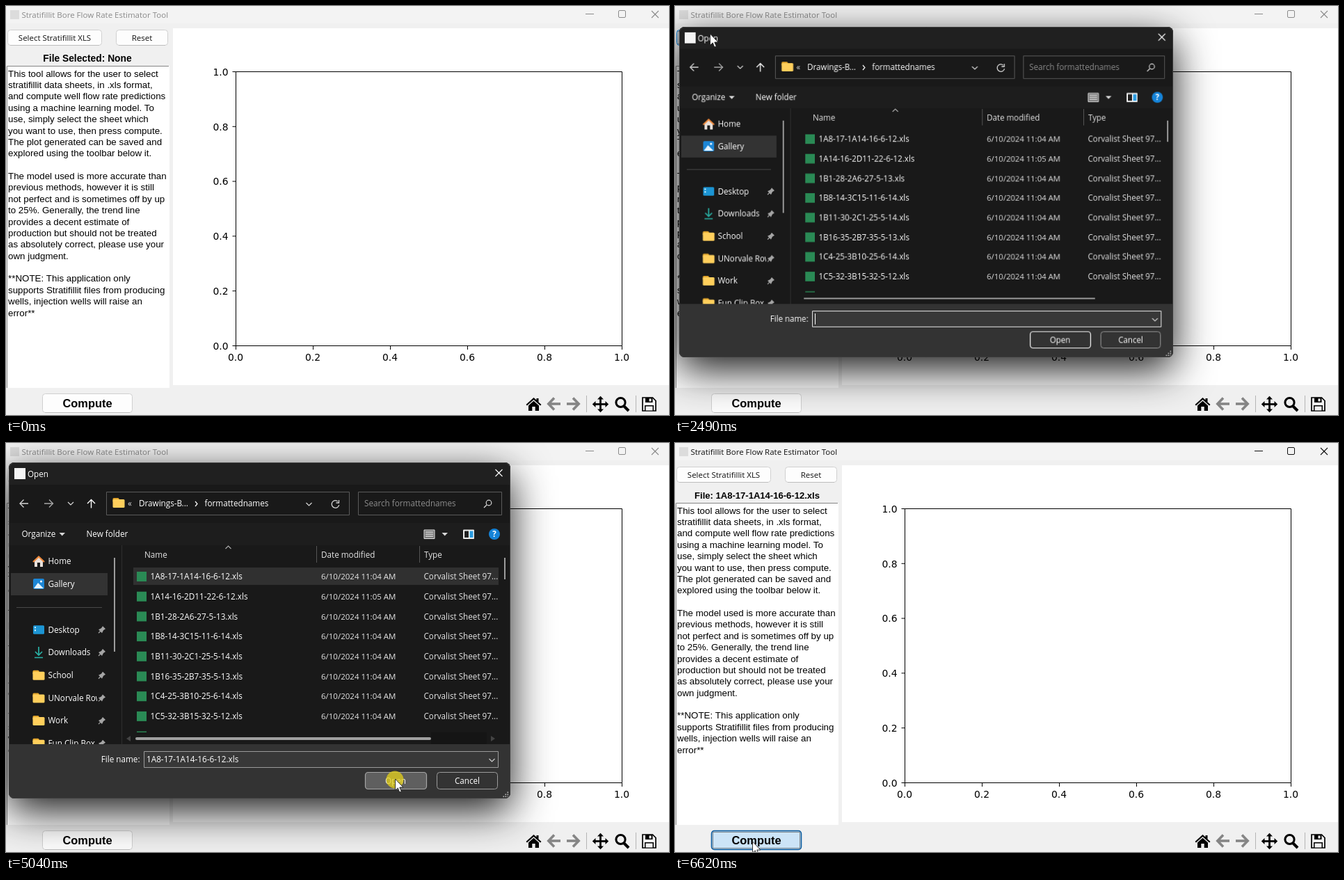
An HTML page with a canvas for the animation above (8 s loop, 953 by 588 pixels).

```html
<!DOCTYPE html>
<html lang="en">
<head>
<meta charset="utf-8">
<title>Flow rate tool</title>
<style>
html, body { margin: 0; width: 100%; height: 100%; overflow: hidden; background: #f0f0f0; }
canvas { display: block; }
</style>
</head>
<body>
<canvas id="stage" width="953" height="588"></canvas>
<script>
const UI = '"Open Sans", "Noto Sans", sans-serif';
const ARIAL = '"Liberation Sans", Arial, sans-serif';
const PLOT = '"DejaVu Sans", sans-serif';
const LOOP = 8000, STEP = 68.9, FIRST = 890;
const WIN = { x: 4, y: 28, w: 721, h: 483 };
const PICK = '1A8-17-1A14-16-6-12.xls';

const stage = document.getElementById('stage').getContext('2d');
const layer = document.createElement('canvas');
layer.width = WIN.w;
layer.height = WIN.h;
const dialog = layer.getContext('2d');
let g = stage;

// ---------- helpers ----------
function text(s, x, y, color = '#fff', size = 11.7, family = UI, align = 'left', weight = '') {
  g.font = `${weight} ${size}px ${family}`;
  g.textAlign = align;
  g.fillStyle = color;
  g.fillText(s, x, y);
}
function rect(x, y, w, h, color) {
  g.fillStyle = color;
  g.fillRect(x, y, w, h);
}
function box(x, y, w, h, r, fill, stroke, lw = 1) {
  g.beginPath();
  g.roundRect(x, y, w, h, r);
  if (fill) { g.fillStyle = fill; g.fill(); }
  if (stroke) { g.strokeStyle = stroke; g.lineWidth = lw; g.stroke(); }
}
function trace(p) {
  g.beginPath();
  for (let i = 0; i < p.length; i += 2) g.lineTo(p[i], p[i + 1]);
}
function line(color, lw, ...p) {
  trace(p);
  g.strokeStyle = color;
  g.lineWidth = lw;
  g.stroke();
}
function poly(color, ...p) {
  trace(p);
  g.fillStyle = color;
  g.fill();
}
function disc(x, y, r, color) {
  g.beginPath();
  g.arc(x, y, r, 0, 7);
  g.fillStyle = color;
  g.fill();
}
function ring(x, y, r, color, lw, a = 0, b = 7) {
  g.beginPath();
  g.arc(x, y, r, a, b);
  g.strokeStyle = color;
  g.lineWidth = lw;
  g.stroke();
}
function clipped(x, y, w, h, draw) {
  g.save();
  g.beginPath();
  g.rect(x, y, w, h);
  g.clip();
  draw();
  g.restore();
}
function cross(x, y, r, color) {
  line(color, 1.1, x - r, y - r, x + r, y + r);
  line(color, 1.1, x + r, y - r, x - r, y + r);
}
function chevron(x, y, r, color, dir = 1) {
  line(color, 1.2, x - r, y - dir * r / 2, x, y + dir * r / 2, x + r, y - dir * r / 2);
}
function dotted(x, y, w, h) {
  g.setLineDash([1, 1]);
  box(x, y, w, h, 0, null, '#222');
  g.setLineDash([]);
}

// ---------- main window ----------
const STYLE = {
  idle: ['#fdfdfd', '#d0d0d0'],
  hover: ['#e0eef9', '#0078d4'],
  down: ['#cce4f7', '#005499']
};
const NOTES = [
  'This tool allows for the user to select',
  'stratifillit data sheets, in .xls format,',
  'and compute well flow rate predictions',
  'using a machine learning model. To',
  'use, simply select the sheet which',
  'you want to use, then press compute.',
  'The plot generated can be saved and',
  'explored using the toolbar below it.',
  '',
  'The model used is more accurate than',
  'previous methods, however it is still',
  'not perfect and is sometimes off by up',
  'to 25%. Generally, the trend line',
  'provides a decent estimate of',
  'production but should not be treated',
  'as absolutely correct, please use your',
  'own judgment.',
  '',
  '**NOTE: This application only',
  'supports Stratifillit files from producing',
  'wells, injection wells will raise an',
  'error**'
];

function button(x, y, w, h, state) {
  const [fill, edge] = STYLE[state];
  box(x + .5, y + .5, w - 1, h - 1, 4, fill, edge, state === 'down' ? 1.5 : 1);
  if (state === 'idle') line('#bdbdbd', 1, x + 4, y + h - .5, x + w - 4, y + h - .5);
}

function titleBar(active) {
  rect(0, 0, 953, 25, '#f3f3f3');
  rect(6, 6, 13, 13, '#dcdcdc');
  const c = active ? '#111' : '#8a8a8a';
  text('Stratifillit Bore Flow Rate Estimator Tool', 22.5, 17, c, 11.5);
  line(c, 1, 833, 11.5, 845, 11.5);
  box(880.5, 6.5, 10, 10, 1.5, null, c);
  cross(933, 12, 5, c);
}

function plot() {
  rect(240, 32, 713, 513, '#fff');
  box(330.5, 94.5, 555, 394, 0, null, '#000');
  for (let i = 0; i <= 5; i++) {
    const x = 330.5 + 111 * i, y = 488.5 - 78.8 * i, s = (i / 5).toFixed(1);
    line('#000', 1, x, 488.5, x, 494);
    line('#000', 1, 325.5, y, 330.5, y);
    text(s, x - .5, 510, '#000', 13.89, PLOT, 'center');
    text(s, 319.5, y + 5.3, '#000', 13.89, PLOT, 'right');
  }
}

function wideArrow(x, dir) {
  const c = '#858585';
  line(c, 3.6, x - 9 * dir, 572, x + 7 * dir, 572);
  line(c, 3.6, x, 563.5, x + 8.2 * dir, 572, x, 580.5);
}

function toolbar() {
  const k = '#000';
  poly(k, 747.5, 573, 758.5, 563, 762.5, 566.6, 762.5, 564, 765.5, 564, 765.5, 569.5, 769.5, 573, 768, 574.5, 758.5, 566, 749, 574.5);
  poly(k, 751, 574.5, 758.5, 567.8, 766, 574.5, 766, 582, 760.7, 582, 760.7, 576, 756.3, 576, 756.3, 582, 751, 582);
  wideArrow(788, -1);
  wideArrow(815, 1);
  for (const x of [834.5, 905.5]) line('#b5b5b5', 1, x, 560, x, 584);
  line(k, 2.8, 846, 572.5, 863, 572.5);
  line(k, 2.8, 854.5, 564, 854.5, 581);
  for (let i = 0; i < 4; i++) {
    g.save();
    g.translate(854.5, 572.5);
    g.rotate(i * Math.PI / 2);
    poly(k, 7, -4.5, 11.7, 0, 7, 4.5);
    g.restore();
  }
  ring(883.5, 570, 6.6, k, 3);
  line(k, 4, 888, 575, 895, 582);
  line(k, 1.7, 915, 563, 929.5, 563, 934, 567.5, 934, 582, 915, 582, 915, 562.2);
  rect(919, 563, 10.5, 7, k);
  rect(924.5, 564.5, 3, 4, '#f0f0f0');
  rect(918, 574, 13, 8, k);
  rect(919.5, 575.5, 10, 6, '#f0f0f0');
}

function mainWindow(s) {
  rect(0, 0, 953, 588, '#f0f0f0');
  titleBar(s.active);
  button(2, 34, 136, 23, s.select);
  text('Select Stratifillit XLS', 70, 50, '#111', 11.5, UI, 'center');
  if (s.selectFocus) dotted(4.5, 36.5, 131, 18);
  button(158, 34, 75, 23, 'idle');
  text('Reset', 195.5, 50, '#111', 11.5, UI, 'center');
  if (s.loaded) text('File: ' + PICK, 118, 79.5, '#000', 13.06, ARIAL, 'center', 'bold');
  else text('File Selected: None', 117, 79.5, '#000', 13.8, ARIAL, 'center', 'bold');
  rect(1, 86, 234, 463, '#fff');
  line('#858585', 1, 1.5, 549, 1.5, 86.5, 234, 86.5);
  NOTES.forEach((n, i) => text(n, 3, 101.6 + 16.38 * i, '#000', 13.35, ARIAL));
  button(52, 557, 130, 28, s.compute);
  if (s.compute === 'down') dotted(54.5, 559.5, 125, 23);
  text('Compute', 117, 576.7, '#000', 16.4, ARIAL, 'center', 'bold');
  plot();
  toolbar();
}

// ---------- file dialog ----------
const FILES = [
  PICK, '1A14-16-2D11-22-6-12.xls', '1B1-28-2A6-27-5-13.xls', '1B8-14-3C15-11-6-14.xls',
  '1B11-30-2C1-25-5-14.xls', '1B16-35-2B7-35-5-13.xls', '1C4-25-3B10-25-6-14.xls', '1C5-32-3B15-32-5-12.xls', ''
];
const PLACES = ['Desktop', 'Downloads', 'School', 'UNorvale Row', 'Work', 'Fun Clip Box'];

function folder(x, y) {
  box(x, y - 7, 9, 6, 1.5, '#e2a52c');
  box(x, y - 5, 17, 12, 1.5, '#ffcf5c');
}
function pin(x, y) {
  line('#a5a5a5', 1.3, x - 5, y + 5, x - 1, y + 1);
  poly('#a5a5a5', x + 1, y - 5, x + 5, y - 1, x + 2, y + 1, x, y + 5, x - 5, y, x - 1, y - 2);
}

function dialogHead() {
  rect(4, 28, 721, 32, '#202020');
  rect(12, 36, 16, 16, '#f4f4f4');
  text('Open', 31, 48.5);
  cross(708.5, 43, 5, '#fff');

  const c = '#d8d8d8';
  line(c, 1.3, 32, 87, 20, 87);
  line(c, 1.3, 25.5, 81.5, 20, 87, 25.5, 92.5);
  line('#a8a8a8', 1.3, 55, 87, 67.5, 87);
  line('#a8a8a8', 1.3, 62, 81.5, 67.5, 87, 62, 92.5);
  chevron(93, 87, 4, c);
  line('#fff', 1.4, 122.5, 93.5, 122.5, 81.5);
  line('#fff', 1.4, 117, 87, 122.5, 81.5, 128, 87);

  box(144.5, 70.5, 349, 33, 0, null, '#5a5a5a');
  folder(153.5, 86);
  text('«', 175, 91, '#ddd');
  text('Drawings-B...', 191, 91);
  line('#fff', 1.2, 272, 84, 275, 87.5, 272, 91);
  text('formattednames', 285.5, 91);
  chevron(435.5, 88, 4, c);
  ring(473.5, 88, 5.3, c, 1.3, .2, 5.4);
  line(c, 1.3, 478.5, 82, 478.5, 86, 474.5, 86);
  box(506.5, 70.5, 206, 33, 0, null, '#5a5a5a');
  text('Search formattednames', 515, 91, '#8c8c8c');
  ring(694, 86, 3.8, c, 1.2);
  line(c, 1.3, 691, 89, 687, 93);

  rect(4, 115, 721, 32, '#1d1d1d');
  text('Organize', 22.5, 135);
  poly(c, 76.5, 129, 85, 129, 80.7, 133.5);
  text('New folder', 115.5, 135);
  box(601, 125, 15, 12.5, 0, '#777', '#e0e0e0');
  for (let i = 0; i < 3; i++) line('#e0e0e0', 1.2, 603, 128.2 + 3 * i, 614, 128.2 + 3 * i);
  poly(c, 626.5, 129, 635, 129, 630.7, 133.5);
  box(657.5, 125, 15, 12.5, 0, '#fff', '#e0e0e0');
  rect(659, 126.5, 6, 9.5, '#202020');
  rect(666.5, 126.5, 5, 9.5, '#2a9be0');
  disc(702, 131, 8, '#1583d8');
  text('?', 702, 135, '#fff', 11.5, UI, 'center', 'bold');
}

function sidebar() {
  rect(7, 187, 139, 32, '#333');
  text('Home', 60.5, 174);
  poly('#e8e0da', 41, 169, 47, 164, 53, 169, 53, 178, 49, 178, 49, 172, 45, 172, 45, 178, 41, 178);
  line('#f08a3c', 2.2, 39, 171, 47, 163.5, 55, 171);
  text('Gallery', 60.5, 207);
  box(39, 195, 16, 15, 2, '#1c86d6');
  poly('#e6f5ff', 40, 209, 46, 201, 54, 209);
  disc(50.5, 199, 1.5, '#fff');
  line('#484848', 1, 15, 236.5, 138, 236.5);
  clipped(5, 147, 161, 286, () => PLACES.forEach((name, i) => {
    const y = 268.3 + 32.7 * i;
    if (i === 0) {
      box(39, y - 6, 16, 12.5, 1.5, '#1c95d4');
      rect(41, y - 4, 2, 2, '#d6f2ff');
      rect(41, y, 2, 2, '#d6f2ff');
    } else if (i === 1) {
      line('#29b3a7', 1.7, 47, y - 8, 47, y + 4);
      line('#29b3a7', 1.7, 42, y - 1, 47, y + 4, 52, y - 1);
      line('#29b3a7', 1.7, 41, y + 7.5, 53, y + 7.5);
    } else folder(38.5, y);
    clipped(60, y - 12, 71, 24, () => text(name, 60.5, y + 4.3));
    pin(138, y);
  }));
  rect(155, 165, 2, 135, '#9c9c9c');
  line('#2f2f2f', 1, 166.5, 147, 166.5, 433);
}

function fileList(s) {
  text('Name', 199, 165, '#e4e4e4');
  text('Date modified', 453, 165, '#e4e4e4');
  text('Type', 601, 165, '#e4e4e4');
  for (const x of [446.5, 594.5]) line('#555', 1, x, 148, x, 172);
  chevron(319.5, 150, 4, '#aaa', -1);
  if (s.row) rect(183, 179, 525, 25, s.row);
  clipped(167, 172, 541, 244, () => FILES.forEach((name, i) => {
    const y = 192 + 28.7 * i;
    rect(188, y - 7, 14, 14, '#2a8a55');
    if (!name) return;
    text(name, 207.5, y + 4.2, '#fff', 11.75);
    text(`6/10/2024 11:0${i === 1 ? 5 : 4} AM`, 453, y + 4.2, '#e4e4e4', 11.5);
    text('Corvalist Sheet 97...', 600.5, y + 4.2, '#e4e4e4');
  }));
  rect(716, 165, 2, 31, '#9c9c9c');
  if (s.wideBar) {
    rect(611, 416, 80, 17, '#151515');
    box(186, 423, 425, 4, 2, '#a0a0a0');
    poly('#444', 173, 425, 179, 421, 179, 429);
    poly('#444', 703, 425, 697, 421, 697, 429);
  } else rect(186, 424, 425, 2, '#9c9c9c');
}

function dialogFoot(s) {
  rect(4, 433, 721, 78, '#333');
  text('File name:', 192.5, 458.5, '#fff', 11.7, UI, 'right');
  box(198.5, 443.5, 509, 23, 0, '#383838', s.picked ? '#9b9b9b' : '#e8e8e8');
  if (s.highlight) rect(201, 447, 134, 16, '#0078d7');
  if (s.picked) text(PICK, 202, 459, '#fff', 11.75);
  if (s.caret) rect(202, 447, 1, 16, '#fff');
  chevron(698.5, 456, 4, '#ccc');
  box(516.5, 473.5, 88, 24, 4, s.openHover ? '#5f5f5f' : '#333', s.openHover ? '#a5a5a5' : '#fff', 1.2);
  text('Open', 560, 489.5, '#fff', 11.7, UI, 'center');
  box(619.5, 473.5, 87, 24, 4, '#333', '#9b9b9b');
  text('Cancel', 663, 489.5, '#fff', 11.7, UI, 'center');
  for (let i = 0; i < 3; i++)
    for (let j = 0; j <= i; j++) rect(720.5 - 3 * j, 501.5 + 3 * i, 1.6, 1.6, '#bbb');
}

// The shadow falls outside the window only, so a fading window stays clear.
function castShadow(x, y, w, h) {
  g.save();
  g.beginPath();
  g.rect(0, 0, 953, 588);
  g.roundRect(x, y, w, h, 8);
  g.clip('evenodd');
  g.shadowColor = 'rgba(0,0,0,.9)';
  g.shadowBlur = 58;
  g.shadowOffsetY = 18;
  box(x, y, w, h, 8, '#000');
  g.restore();
}

function fileDialog(s) {
  g = dialog;
  g.clearRect(0, 0, WIN.w, WIN.h);
  g.save();
  g.translate(-WIN.x, -WIN.y);
  g.beginPath();
  g.roundRect(WIN.x, WIN.y, WIN.w, WIN.h, 8);
  g.clip();
  rect(WIN.x, WIN.y, WIN.w, WIN.h, '#191919');
  dialogHead();
  sidebar();
  fileList(s);
  dialogFoot(s);
  box(4.5, 28.5, 720, 482, 8, null, '#3c3c3c');
  g.restore();
  g = stage;

  const [dx, dy, dw, dh] = s.inset;
  const place = [WIN.x + dx, WIN.y + dy, WIN.w + dw, WIN.h + dh];
  g.save();
  g.globalAlpha = s.alpha;
  castShadow(...place);
  g.drawImage(layer, ...place);
  g.restore();
}

// ---------- pointer ----------
// step, x, y
const PATH = [
  [0, 357, 574], [3, 310, 480], [7, 150, 230], [11, 50, 69], [13, 50, 50], [16, 50, 38],
  [17, 50, 38], [18, 50, 40], [24, 50, 40], [29, 100, 81], [33, 250, 150], [37, 347, 195],
  [42, 347, 195], [48, 430, 310], [54, 545, 450], [58, 559, 483],
  [68, 559, 483], [71, 470, 515], [75, 220, 560], [78, 111, 573]
];
function pointerAt(n) {
  const i = PATH.findIndex(p => p[0] > n);
  if (i < 0) return PATH[PATH.length - 1].slice(1);
  const [a, x, y] = PATH[i - 1], [b, u, v] = PATH[i], k = (n - a) / (b - a);
  return [x + (u - x) * k, y + (v - y) * k];
}
function pointer(x, y) {
  g.save();
  g.translate(x + .5, y);
  poly('#fff', 0, 0, 0, 16.3, 3.8, 12.9, 6.2, 19, 8.8, 18, 6.3, 12, 11.4, 12);
  g.closePath();
  g.strokeStyle = '#222';
  g.lineWidth = .9;
  g.stroke();
  g.restore();
}

// ---------- timeline ----------
const within = (n, a, b) => n >= a && n <= b;
const scaled = (k, d) => d.map(v => v * k);

function dialogState(n, y) {
  const opening = Math.max(0, 24 - n), closing = n === 62 ? 1 : n === 61 ? .4 : 0;
  return {
    inset: closing ? scaled(closing, [15, 11, -36, -25]) : scaled(opening, [2, 2, -11, -8]),
    alpha: closing ? (n === 62 ? .22 : .65) : [1, 1, .85, .4][opening],
    row: n >= 60 ? '#303030' : n >= 39 ? '#777' : y > 179 ? '#4d4d4d' : null,
    picked: n >= 39,
    caret: within(n, 22, 29),
    wideBar: n >= 43 && y > 405,
    openHover: n >= 43 && y > 472,
    highlight: n >= 61
  };
}

function draw(time) {
  const n = Math.floor((time - FIRST) / STEP);
  const shown = n >= 0;
  const [x, y] = shown ? pointerAt(n) : [0, 0];
  const overCompute = n > 68 && x < 182 && y > 557;
  mainWindow({
    active: within(n, 18, 20) || n >= 62,
    select: within(n, 18, 19) ? 'down' : within(n, 12, 23) && y < 57 ? 'hover' : 'idle',
    selectFocus: within(n, 18, 81),
    loaded: n >= 64,
    compute: n >= 82 ? 'down' : overCompute ? 'hover' : 'idle'
  });
  if (within(n, 21, 62)) fileDialog(dialogState(n, y));
  if (within(n, 18, 19) || within(n, 39, 40) || within(n, 59, 60) || n === 82)
    disc(x, y + 1, 12.5, 'rgba(226,207,25,.76)');
  if (shown) pointer(x, y);
}

function tick() {
  draw(performance.now() % LOOP);
  requestAnimationFrame(tick);
}
tick();
</script>
</body>
</html>
```
